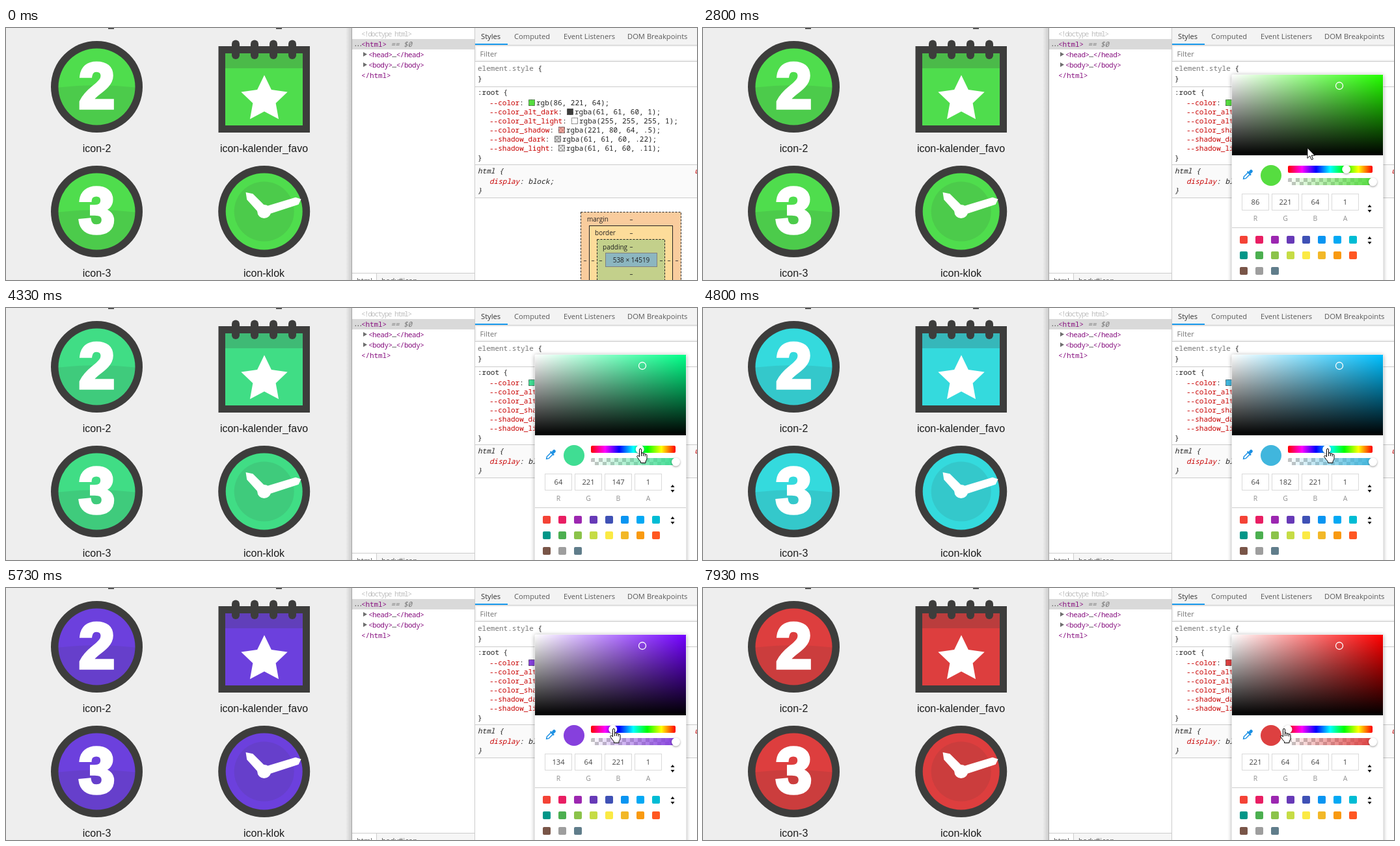
Recreate the animation shown at these times as an HTML page. Size 1062 by 388 pixels, loop 8 s.

```html
<!DOCTYPE html>
<html lang="en">
<head>
<meta charset="utf-8">
<title>Live icon colours</title>
<style>
html, body { margin: 0; width: 100%; height: 100%; overflow: hidden; background: #fff; }
svg { display: block; width: 1062px; height: 388px; }
.label { font: 16px "Liberation Sans", Arial, sans-serif; fill: #1c1c1c; text-anchor: middle; }
.digit { font: bold 99px "Liberation Sans", Arial, sans-serif; fill: #fff; stroke: #fff; stroke-width: 5.5; text-anchor: middle; }
.code { font: 11px "Noto Sans Mono", monospace; fill: #222; }
.tree { font: 11px "Noto Sans Mono", monospace; fill: #881280; letter-spacing: -.5px; }
.ui { font: 11.2px "Open Sans", sans-serif; fill: #5a5a5a; }
.box { font: 10px "Open Sans", sans-serif; fill: #222; }
.mid { text-anchor: middle; }
.italic { font-style: italic; }
.name { fill: #c80000; }
.dark { fill: #3d3d3c; }
.icon { fill: var(--icon); }
.pick { fill: var(--pick); }
.shade { fill: rgba(61, 61, 60, .11); }
.shade2 { fill: rgba(61, 61, 60, .22); }
.line { stroke: #ccc; fill: none; }
.knob { fill: #fff; filter: drop-shadow(0 1px 1.5px rgba(0, 0, 0, .4)); }
.pop { filter: drop-shadow(0 1px 3px rgba(0, 0, 0, .35)); }
.cursor { fill: #fff; stroke: #000; stroke-linejoin: round; }
</style>
</head>
<body>
<svg id="stage" viewBox="0 0 1062 388"></svg>
<script>
const LOOP = 8000, STEP = 200 / 3;
const stage = document.getElementById('stage');

const rect = (x, y, w, h, attrs) => `<rect x="${x}" y="${y}" width="${w}" height="${h}" ${attrs}/>`;
const circle = (x, y, r, attrs) => `<circle cx="${x}" cy="${y}" r="${r}" ${attrs}/>`;
const text = (x, y, cls, s, attrs = '') => `<text x="${x}" y="${y}" class="${cls}" ${attrs}>${s}</text>`;
const path = (d, attrs) => `<path d="${d}" ${attrs}/>`;
const hline = (y, x1, x2) => path(`M${x1} ${y}.5H${x2}`, 'class="line"');
const tag = s => `&lt;${s}&gt;`;

function defs() {
  const stops = ['#f00', '#f0f', '#00f', '#0ff', '#0f0', '#ff0', '#f00']
    .map((c, i) => `<stop offset="${i / 6}" stop-color="${c}"/>`).join('');
  const grad = (id, a, b, dir = '') => `<linearGradient id="${id}" ${dir}><stop style="${a}"/><stop offset="1" style="${b}"/></linearGradient>`;
  const down = 'x2="0" y2="1"';
  const checker = (id, s) => `<pattern id="${id}" width="${2 * s}" height="${2 * s}" patternUnits="userSpaceOnUse" x="899" y="231">
    ${rect(0, 0, 2 * s, 2 * s, 'fill="#fff"')}${path(`M0 0h${s}v${2 * s}h${s}v${-s}H0z`, 'fill="#c4c4c4"')}</pattern>`;
  return `<defs><linearGradient id="rainbow">${stops}</linearGradient>
    ${grad('sat', 'stop-color:#fff', 'stop-color:var(--hue)')}
    ${grad('val', 'stop-color:#000;stop-opacity:0', 'stop-color:#000', down)}
    ${grad('alpha', 'stop-color:var(--pick);stop-opacity:0', 'stop-color:var(--pick)')}
    ${grad('edge', 'stop-color:#000;stop-opacity:0', 'stop-color:#000;stop-opacity:.14')}
    ${grad('tip', 'stop-color:#fff', 'stop-color:#f0f0f0', down)}
    ${checker('check', 6)}${checker('fine', 3)}</defs>`;
}

function numberIcon(n, y) {
  return circle(139.5, y, 70.5, 'class="dark"') + circle(139.5, y, 59, 'class="icon"')
    + path(`M80.5 ${y + 1}Q139.5 ${y - 6} 198.5 ${y + 1}A59 59 0 0 1 80.5 ${y + 1}Z`, 'class="shade"')
    + text(139.5, y + 32.7, 'digit', n) + text(139.5, y + 100.5, 'label', 'icon-' + n);
}

function calendar() {
  const star = Array.from({ length: 10 }, (_, i) => {
    const a = i * Math.PI / 5, r = i % 2 ? 18.5 : 37.5;
    return `${397 + r * Math.sin(a)},${110 - r * Math.cos(a)}`;
  }).join(' ');
  return rect(326.5, 28, 140.5, 133, 'class="dark"') + rect(337, 39, 119, 111, 'class="icon"')
    + rect(337, 39, 119, 23, 'class="shade2"')
    + [353, 382, 411, 440].map(x => rect(x - 6, 18.5, 12, 29.5, 'rx="6" class="dark"')).join('')
    + `<polygon points="${star}" fill="#fff"/>` + text(396.5, 191, 'label', 'icon-kalender_favo');
}

function clock() {
  return circle(396.7, 282.5, 70.5, 'class="dark"') + circle(396.7, 282.5, 59, 'class="icon"')
    + circle(396.7, 282.5, 46, 'class="shade"') + circle(396.7, 282.5, 10.5, 'fill="#fff"')
    + path('M394 277L445 261.5L452.5 264L449 271L400 287ZM389 284L371 264L369.5 254L379 256L402 279Z',
      'fill="#fff" stroke="#fff" stroke-width="1.6"')
    + text(396.5, 383, 'label', 'icon-klok');
}

function page() {
  return rect(0, 0, 531, 388, 'fill="#eee"') + rect(522, 0, 9, 388, 'fill="url(#edge)"')
    + rect(157, 0, 9, 1.5, 'fill="#333"') + rect(415, 0, 9, 1.5, 'fill="#333"')
    + numberIcon(2, 90.5) + numberIcon(3, 282.5) + calendar() + clock();
}

function domTree() {
  const arrow = y => path(`M549 ${y}l6 3.5l-6 3.5z`, 'fill="#6e6e6e"');
  return rect(531, 0, 531, 388, 'fill="#fff"') + rect(531, 0, 1, 388, 'fill="#a3a3a3"')
    + rect(532, 17, 188, 16, 'fill="#d9d9d9"')
    + text(546, 13, 'tree', tag('!doctype html'), 'style="fill:#c0c0c0;letter-spacing:-1.5px"')
    + text(534, 28, 'tree', '...', 'style="fill:#444;letter-spacing:-2.6px"')
    + text(546, 29, 'tree', tag('html') + ' <tspan fill="#777" font-style="italic">== $0</tspan>', 'style="letter-spacing:-.1px"')
    + ['head', 'body'].map((n, i) => arrow(37 + 16 * i)
      + text(557, 45 + 16 * i, 'tree', `${tag(n)}<tspan fill="#222">…</tspan>${tag('/' + n)}`)).join('')
    + text(546, 77, 'tree', tag('/html'), 'style="letter-spacing:-.1px"')
    + hline(377, 532, 720) + rect(532, 378, 37, 10, 'fill="#fff"') + rect(569, 378, 151, 10, 'fill="#f6f6f6"')
    + path('M569.5 378V388', 'class="line"')
    + text(539, 392.5, 'ui', 'html') + text(577, 392.5, 'ui', 'body#icon');
}

const RULES = [
  ['--color', 'rgb(86, 221, 64)', 'var(--pick)'],
  ['--color_alt_dark', 'rgba(61, 61, 60, 1)', '#3d3d3c'],
  ['--color_alt_light', 'rgba(255, 255, 255, 1)', '#fff'],
  ['--color_shadow', 'rgba(221, 80, 64, .5)', 'rgba(221,80,64,.5)'],
  ['--shadow_dark', 'rgba(61, 61, 60, .22)', 'rgba(61,61,60,.22)'],
  ['--shadow_light', 'rgba(61, 61, 60, .11)', 'rgba(61,61,60,.11)']
];

function styleRule([name, value, fill], i) {
  const y = 119 + 14 * i, x = Math.round(743.6 + (name.length + 2) * 6.6);
  return text(743, y, 'code', `<tspan class="name">${name}</tspan>:`)
    + rect(x, y - 9, 10, 10, 'fill="url(#fine)"')
    + rect(x + .5, y - 8.5, 9, 9, `style="fill:${fill}" stroke="#000" stroke-opacity=".4"`)
    + text(x + 12, y, 'code', value + ';');
}

function boxModel() {
  const layer = (x, y, w, fill, extra) => rect(x + .5, y + .5, w, 200, `fill="${fill}" stroke="#222" ${extra}`);
  const dash = 'stroke-dasharray="3 2"';
  return layer(883, 283, 154, '#f9cc9d', dash) + layer(896, 304, 128, '#fddc9a', '')
    + layer(908, 325, 104, '#c3d08b', dash) + rect(921.5, 346.5, 79, 21, 'fill="#8cb6c0" stroke="#808080"')
    + text(893, 298, 'box', 'margin') + text(905, 319, 'box', 'border') + text(917, 340.5, 'box', 'padding')
    + text(961, 361, 'box mid', '538 × 14519')
    + [298, 319, 340, 382].map(y => text(961, y, 'box mid', '–')).join('')
    + [890, 902, 914, 1007, 1019, 1031].map(x => text(x, 361, 'box mid', '–')).join('');
}

function stylesPane() {
  const tabs = [[730, 'Styles'], [781, 'Computed'], [857, 'Event Listeners'], [955, 'DOM Breakpoints']];
  return rect(721, 0, 341, 51, 'fill="#f3f3f3"') + rect(723, 29, 339, 20, 'fill="#fff"')
    + tabs.map(([x, s], i) => text(x, 17, 'ui', s, i ? '' : 'style="fill:#333"')).join('')
    + hline(26, 721, 1062) + rect(721, 24, 50, 2, 'fill="#1a9cf0"')
    + text(728.5, 44, 'ui', 'Filter', 'style="fill:#757575"') + hline(51, 721, 1062)
    + text(725, 66, 'code', '<tspan fill="#777">element.style</tspan> {') + text(725, 82, 'code', '}') + hline(90, 721, 1062)
    + text(725, 103, 'code', ':root {') + RULES.map(styleRule).join('') + text(725, 204, 'code', '}')
    + rect(721, 211, 341, 50, 'fill="#fafafa"') + hline(210, 721, 1062) + hline(261, 721, 1062)
    + text(725, 224, 'code italic', 'html {')
    + text(743, 240, 'code italic', '<tspan class="name">display</tspan>: block;')
    + text(725, 254, 'code italic', '}') + text(1058.5, 224, 'code italic name', 'user agent')
    + boxModel() + path('M720.5 0V388', 'class="line"');
}

function checkboxes() {
  return RULES.map((_, i) => rect(725.5, 109.5 + 14 * i, 11, 11, 'rx="2" fill="#e6e6e6" stroke="#a0a0a0"')
    + path(`M728 ${115 + 14 * i}l2.3 2.7l4.5 -6`, 'fill="none" stroke="#222" stroke-width="2"')).join('');
}

function tooltip() {
  return rect(822.5, 129.5, 330, 25, 'fill="url(#tip)" stroke="#8a8a8a" class="pop"')
    + text(831, 147, 'ui', 'Open color picker. Shift + Click to change color format', 'style="fill:#444;font-size:11px"');
}

function picker() {
  const sorter = y => path(`M1021.5 ${y}l3 -4l3 4zM1021.5 ${y + 4}h6l-3 4z`, 'fill="#111"');
  const swatches = ('f44336 e91e63 9c27b0 673ab7 3f51b5 0a95f2 03a9f4 00bcd4 009688 4caf50 8bc34a c6dc45 '
    + 'fbea44 f2b828 f99a10 ff5722 795548 9e9e9e 607d8b').split(' ');
  return rect(812.5, 71.5, 233, 330, 'rx="2" fill="#fff" class="pop"')
    + rect(813, 72, 232, 124, 'fill="url(#sat)"') + rect(813, 72, 232, 124, 'fill="url(#val)"')
    + circle(978, 89, 5.5, 'fill="none" stroke="#fff" stroke-width="1.3"')
    + `<g transform="translate(837 226) rotate(45)" fill="#1a8fe3">${rect(-2.4, -10, 4.8, 6, 'rx="2.2"')}${rect(-4, -4.5, 8, 2.4, 'rx="1"')}
       ${path('M-2 -2V6L0 9L2 6V-2', 'fill="none" stroke="#1a8fe3" stroke-width="1.5"')}</g>`
    + circle(873, 227, 16, 'class="pick"')
    + rect(899, 212, 130, 11, 'rx="2" fill="url(#rainbow)"')
    + rect(899, 231, 130, 11, 'rx="2" fill="url(#check)"') + rect(899, 231, 130, 11, 'rx="2" fill="url(#alpha)"')
    + circle(0, 217.5, 6.5, 'class="knob" id="hueKnob"') + circle(1029.5, 237, 6.5, 'class="knob"')
    + ['R', 'G', 'B', 'A'].map((c, i) => rect(828.5 + 46 * i, 255.5, 41, 25, 'fill="#fff" stroke="#dadada"')
      + text(849 + 46 * i, 272, 'ui mid', '1', `id="val${c}" style="fill:#444"`)
      + text(849 + 46 * i, 297, 'ui mid', c, 'style="fill:#909090;font-size:10.5px"')).join('')
    + sorter(276) + hline(307, 813, 1045) + sorter(325)
    + swatches.map((c, i) => rect(825 + 24 * (i % 8), 320 + 24 * (i >> 3), 12, 12, `rx="2" fill="#${c}"`)).join('');
}

function cursors() {
  const hand = 'M4.5 13V2.2Q4.5 .6 6 .6T7.5 2.2V8Q7.5 7 8.9 7T10.4 8.4V9Q10.6 7.8 11.9 7.9T13.2 9.4V10Q13.6 9 14.8 9.2T16 10.8V15.5Q16 18 14 20V22.5H6.5V20.5Q4 18 1 13.5Q.2 11.8 1.5 11.3T4.5 13Z';
  return path('M.5 .5V16.5L4.3 13L6.8 18.8L9.2 17.8L6.8 12.2H12Z', 'class="cursor" id="arrow"')
    + `<g id="hand" class="cursor">${path(hand, '')}${path('M7.5 8V12M10.4 9V12M13.2 10V12.5', '')}</g>`;
}

stage.innerHTML = defs() + page() + domTree() + stylesPane()
  + `<g id="checks">${checkboxes()}</g><g id="tooltip">${tooltip()}</g><g id="picker">${picker()}</g>` + cursors();

// Tables of [time, value...], interpolated linearly; icons trail the picker and carry their own darkest channel.
const HUE = [[0, 111.6], [3270, 111.6], [3400, 106], [3667, 106], [3866.7, 108.9], [4800, 194.9], [5733.3, 266.75], [6333.3, 341.7], [6866, 360]];
const ICON = [[0, 119, 77], [3270, 119, 77], [3400, 112, 76], [3866.7, 112, 76], [4800, 181, 52], [5733.3, 257, 64], [6333.3, 312, 58], [7000, 360, 62]];
const POINTER = [[530, 1054, 384], [930, 925, 238], [1330, 822, 153], [1467, 811, 116], [2333, 811, 116], [2700, 905, 172],
  [3067, 991, 216], [3667, 991, 216], [3866.7, 990, 216], [4800, 960, 216], [5733.3, 934, 216], [6333.3, 906, 214],
  [6866, 900, 216], [7600, 900, 216], [7933, 893, 216]];

function sample(table, t) {
  const i = table.findIndex(row => row[0] > t);
  if (i < 0) return table[table.length - 1].slice(1);
  if (i === 0) return table[0].slice(1);
  const a = table[i - 1], b = table[i], k = (t - a[0]) / (b[0] - a[0]);
  return a.slice(1).map((v, j) => v + (b[j + 1] - v) * k);
}

const rgb = (h, low = 64) => [5, 3, 1].map(n => {
  const k = (n + h / 60) % 6;
  return Math.round(221 - (221 - low) * Math.max(0, Math.min(k, 4 - k, 1)));
});

const $ = id => document.getElementById(id);
const show = (id, on) => { $(id).style.display = on ? '' : 'none'; };

function draw(t) {
  const [hue] = sample(HUE, t), [x, y] = sample(POINTER, t), picked = rgb(hue);
  stage.style.setProperty('--pick', `rgb(${picked})`);
  stage.style.setProperty('--icon', `rgb(${rgb(...sample(ICON, t))})`);
  stage.style.setProperty('--hue', `hsl(${hue}, 100%, 50%)`);
  $('hueKnob').setAttribute('cx', 899 + 130 * (1 - hue / 360));
  ['R', 'G', 'B'].forEach((c, i) => { $('val' + c).textContent = picked[i]; });

  const onSlider = t > 2990;
  show('checks', t > 1060 && t < 2460);
  show('tooltip', t > 1525 && t < 1795);
  show('picker', t > 1860);
  show('arrow', t > 525 && !onSlider);
  show('hand', onSlider);
  $('arrow').setAttribute('transform', `translate(${x} ${y})`);
  $('hand').setAttribute('transform', `translate(${x - 6} ${y})`);
}

const start = performance.now();
function tick() {
  const t = (performance.now() - start) % LOOP;
  draw(Math.floor((t + 4) / STEP) % 120 * STEP);
  requestAnimationFrame(tick);
}
tick();
</script>
</body>
</html>
```
